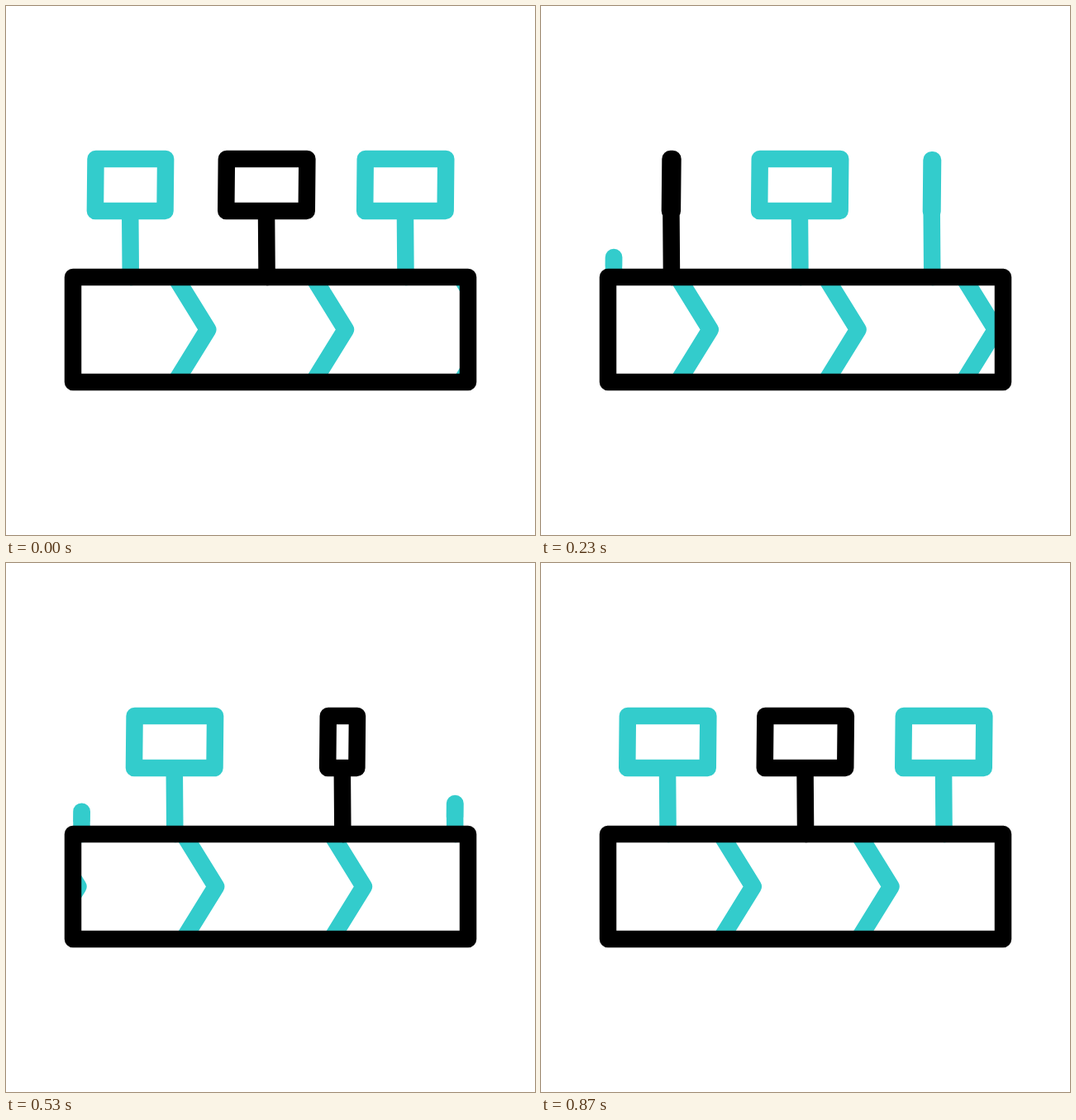
These frames come from a looping animation (640 by 640 pixels, 1.67 s). An HTML page:

```html
<!DOCTYPE html>
<html lang="en">
<head>
<meta charset="utf-8">
<title>Conveyor</title>
<style>
  html, body { margin: 0; width: 100%; height: 100%; overflow: hidden; background: #fff; }
  svg { display: block; width: 100%; height: 100%; }
  path, rect { fill: none; stroke-width: 20.5; stroke-linecap: round; stroke-linejoin: round; }
</style>
</head>
<body>
<svg viewBox="0 0 640 640">
  <clipPath id="belt"><rect x="81" y="328" width="478" height="127"/></clipPath>
  <g clip-path="url(#belt)"><path id="arrows" stroke="#33cccc"/></g>
  <g id="signs"></g>
  <rect x="81" y="328" width="478" height="127" stroke="#000"/>
</svg>
<script>
const LOOP = 1670, FRAME = 100 / 3, REST = 26;
const TEAL = '#33cccc', BLACK = '#000';
const BASE = 328, HEAD_W = 97.5, HEAD_TOP = 143, HEAD_BOTTOM = 80;
const PERIOD = 345.5, GAP = 166.7;

// Monotone cubic through [x, y] points, coming to rest at the last one.
function curve(...pts) {
  const last = pts.length - 1;
  const rise = i => (pts[i + 1][1] - pts[i][1]) / (pts[i + 1][0] - pts[i][0]);
  const slope = pts.map((p, i) => {
    if (i === 0) return rise(0);
    if (i === last) return 0;
    const a = rise(i - 1), b = rise(i);
    return a * b > 0 ? 2 * a * b / (a + b) : 0;
  });
  return x => {
    if (x <= pts[0][0]) return pts[0][1];
    if (x >= pts[last][0]) return pts[last][1];
    let i = 0;
    while (x > pts[i + 1][0]) i++;
    const [x0, y0] = pts[i], [x1, y1] = pts[i + 1];
    const h = x1 - x0, u = (x - x0) / h, v = 1 - u;
    return v * v * (1 + 2 * u) * y0 + u * u * (3 - 2 * u) * y1
      + h * u * v * (v * slope[i] - u * slope[i + 1]);
  };
}

function ramp(n, [from, to]) {
  const u = Math.min(1, Math.max(0, (n - from) / (to - from)));
  return u * u * (3 - 2 * u);
}

const travel = curve([-1, 0], [0, 12.5], [4, 112], [7, 218.7], [10, 303.7],
  [13, 416.5], [19, 592.3], [REST, 2 * PERIOD]);

// Each sign slides left; its width and height open or close over a span of frames.
const signs = [
  { color: TEAL, leaving: true, wide: [-1.3, 4.4], tall: [3.76, 8.14],
    x: curve([0, 150.5], [4, 116], [7, 88], [9, 80]) },
  { color: BLACK, leaving: true, wide: [2.92, 7.47], tall: [7.6, 12.97],
    x: curve([0, 315.3], [4, 247], [7, 157.7], [10, 105], [13, 81]) },
  { color: TEAL, leaving: true, wide: [7.64, 13], tall: [12.4, 17.4],
    x: curve([0, 483.2], [4, 416.7], [7, 313.2], [10, 227], [13, 132], [18, 81]) },
  { color: TEAL, wide: [8.1, 13.2], tall: [2.19, 7.28],
    x: curve([2, 558], [4, 541], [7, 473], [10, 395], [13, 282.6], [19, 161.5], [REST, 153.3]) },
  { color: BLACK, wide: [13.4, 19.8], tall: [8.19, 13.28],
    x: curve([8, 558], [10, 541], [13, 480.2], [19, 353.3], [REST, 319.8]) },
  { color: TEAL, wide: [19.6, 26], tall: [14.2, 19.6],
    x: curve([14, 555], [19, 525.7], [REST, 487.3]) }
];

const group = document.getElementById('signs');
const arrows = document.getElementById('arrows');
for (const sign of signs) {
  sign.path = document.createElementNS('http://www.w3.org/2000/svg', 'path');
  sign.path.setAttribute('stroke', sign.color);
  group.append(sign.path);
}

function signPath(sign, n) {
  const amount = span => sign.leaving ? 1 - ramp(n, span) : ramp(n, span);
  const k = amount(sign.tall);
  if (k <= 0) return '';
  const x = sign.x(n);
  const w = Math.max(1.5 * k, HEAD_W * amount(sign.wide)) / 2;
  const top = BASE - HEAD_TOP * k, bottom = BASE - HEAD_BOTTOM * k;
  const lean = 0.3 * k;
  return `M${x - w + lean} ${top}H${x + w + lean}L${x + w - lean} ${bottom}H${x - w - lean}Z`
    + `M${x - lean} ${bottom}L${x + lean} ${BASE}`;
}

function arrowPath(n) {
  let d = '';
  for (let i = -1; i < 4; i++) {
    for (const offset of [0, GAP]) {
      const tip = 256.7 + offset + i * PERIOD - travel(n);
      d += `M${tip - 39.2} 328L${tip} 391.5L${tip - 39.2} 455`;
    }
  }
  return d;
}

function render(ms) {
  const n = Math.min(REST, Math.floor((ms % LOOP + 3.4) / FRAME));
  arrows.setAttribute('d', arrowPath(n));
  for (const sign of signs) sign.path.setAttribute('d', signPath(sign, n));
}

let start;
function tick(now) {
  start ??= now;
  render(Math.max(0, now - start));
  requestAnimationFrame(tick);
}
render(0);
requestAnimationFrame(tick);
</script>
</body>
</html>
```
